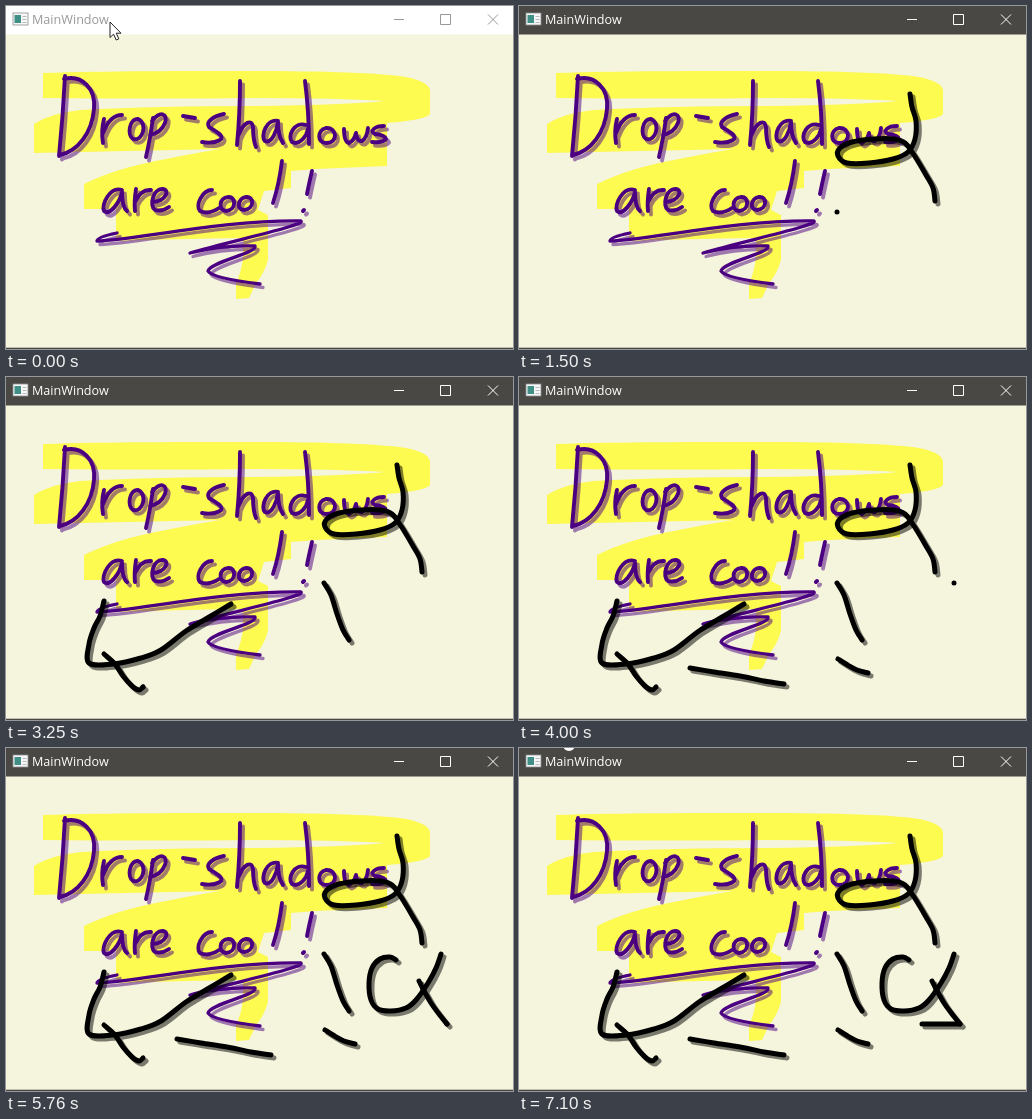
Write an HTML page that moves like this. It is 507 by 343 pixels and loops after 7.26 s.

```html
<!DOCTYPE html>
<html lang="en">
<head>
<meta charset="utf-8">
<title>MainWindow</title>
<style>
  html, body { margin: 0; width: 100%; height: 100%; overflow: hidden; background: #f5f4dc; }
  svg { display: block; width: 507px; height: 343px; }
  text { font: 12.6px "Open Sans", "Noto Sans", sans-serif; }
  .ink { fill: none; stroke-linecap: round; stroke-linejoin: round; }
</style>
</head>
<body>
<svg viewBox="0 0 507 343">
  <rect width="507" height="343" fill="#f5f4dc"/>

  <!-- highlighter -->
  <g fill="#fdfa50">
    <path d="M37 67 C100 65 180 65 245 65 C320 65 375 67 400 71 Q424 76 424 85 V108
      Q420 114 381 117 V160 L310 163 L285 165 V182 L258 185 L252 204 L262 209 V254
      Q258 268 250 277 L243 292 L230 293 V277 Q236 265 237 250 L237 232 Q170 233 110 235
      V203 H78 V178 Q110 162 160 153 Q195 146 215 143 Q120 145 28 147 V118
      Q45 107 75 104 Q150 100 250 100 Q340 99 379 95 Q330 92 250 92 Q150 93 37 92 Z"/>
  </g>

  <!-- handwriting -->
  <use href="#note" transform="translate(3 3.5)" opacity=".5"/>
  <g id="note" class="ink" stroke="#4b0082" stroke-width="3.9">
    <path d="M59 70 Q57 110 53 150 M58 73 C76 68 90 83 88 103 C86 127 72 145 54 149"/>
    <path d="M98 113 Q95 125 97 137 M97 127 Q104 109 116 109"/>
    <path d="M132 113 C123 113 121 129 127 133 C137 136 142 117 132 113"/>
    <path d="M147 112 Q144 134 140 151 M146 115 C155 104 162 108 159 117 Q155 127 144 129"/>
    <path d="M177 110 L189 112"/>
    <path d="M218 108 C208 110 199 116 203 121 C211 126 219 130 214 134 Q207 138 196 136"/>
    <path d="M234 75 Q234 108 231 139 M232 130 C238 115 246 113 247 121 Q247 134 250 141"/>
    <path d="M272 115 C261 112 254 130 259 135 C266 138 271 124 272 116 Q272 130 277 137"/>
    <path d="M300 119 C288 115 281 131 286 136 C294 140 301 129 302 123 M299 75 Q303 106 303 138"/>
    <path d="M320 122 C311 124 311 137 320 137 C333 137 331 121 320 122"/>
    <path d="M338 123 Q338 136 343 137 Q348 135 350 127 Q351 136 356 135 Q361 132 362 122"/>
    <path d="M378 120 C369 120 363 125 369 128 Q379 129 380 133 Q377 137 366 136"/>
    <path d="M116 184 C104 180 95 199 98 205 C104 210 114 196 116 186 Q116 201 121 205"/>
    <path d="M130 183 Q128 196 129 205 M129 196 Q135 183 145 184"/>
    <path d="M147 196 C160 195 164 184 157 183 C147 182 143 200 149 204 Q156 206 163 201"/>
    <path d="M206 184 C196 184 189 200 194 205 Q203 209 213 202"/>
    <path d="M222 191 C213 192 212 204 220 205 C231 204 230 190 222 191"/>
    <path d="M240 191 C232 192 230 204 238 204 C249 203 248 190 240 191"/>
    <path d="M276 155 Q273 179 267 197"/>
    <path d="M306 165 Q303 178 301 188 M297 205 L298 204"/>
    <path stroke-width="3.3" d="M111 227 Q91 231 91 235 C130 234 215 214 295 215
      C300 219 225 235 184 247 Q215 239 249 240 C252 247 204 256 202 265 Q206 272 254 278"/>
  </g>

  <g id="shade" class="ink" stroke="#000" stroke-width="5" opacity=".5" transform="translate(3 3)"></g>
  <g id="lines" class="ink" stroke="#000" stroke-width="5"></g>
  <circle id="dot" r="2.5"/>

  <!-- window frame -->
  <rect id="bar" width="507" height="28.5"/>
  <rect x="7" y="7" width="15" height="12" fill="#f7f7f7" stroke="#8a8d90" stroke-width=".8"/>
  <rect x="8.5" y="9" width="6.5" height="8" fill="#3f8f86"/>
  <path d="M16.5 10.5h4m-4 3h4m-4 3h4" stroke="#b5babd"/>
  <text id="label" x="26" y="18">MainWindow</text>
  <path id="buttons" fill="none" d="M388 13.5h10 M434.5 8.5h10v10h-10z M482 8.5l10 10m0-10l-10 10"/>
  <rect y="341.7" width="507" height="1.3" fill="#4a4844"/>
  <path id="arrow" d="M0 0V15.5L3.6 12.2L6.2 18L8.8 16.9L6.3 11.2H11Z" fill="#fff" stroke="#222" stroke-width="1"/>
  <circle id="tip" cx="50" cy="-3" r="6" fill="#fff"/>
</svg>
<script>
const LOOP = 7260, STEP = 83.45;
const $ = id => document.getElementById(id);

// Smooth curve through a few points.
function curve(text) {
  const p = text.split(' ').map(s => s.split(',').map(Number));
  let d = 'M' + p[0];
  for (let i = 0; i < p.length - 1; i++) {
    const a = p[i - 1] || p[i], b = p[i], c = p[i + 1], e = p[i + 2] || c;
    const h1 = b.map((v, k) => v + (c[k] - a[k]) / 6);
    const h2 = c.map((v, k) => v - (e[k] - b[k]) / 6);
    d += `C${h1} ${h2} ${c}`;
  }
  return d;
}

function addPath(parent, d) {
  const el = document.createElementNS('http://www.w3.org/2000/svg', 'path');
  el.setAttribute('d', d);
  $(parent).append(el);
  return el;
}

// Pen strokes: start, end, points.
const strokes = [
  [780, 1330, '391,88 393,101 397,115 396,133 389,146 374,153 350,157 328,157 319,150 321,142 333,136 355,133 375,133 386,137 395,149 407,169 414,182 416,195'],
  [1570, 1820, '318,206 325,218 331,237 337,253 343,263'],
  [1950, 2550, '225,227 205,239 180,254 155,273 135,281 107,287 83,286 83,267 88,251 94,239 98,224'],
  [2880, 3210, '98,277 109,287 117,299 126,309 133,313 137,310'],
  [3330, 3580, '171,291 195,295 221,299 245,304 265,307'],
  [3650, 3835, '319,282 327,287 338,293 349,296'],
  [4070, 4920, '435,206 430,220 422,235 410,252 400,260 385,263 372,261 365,252 363,235 366,220 374,211 384,209 390,212'],
  [5085, 5165, '413,233 417,241'],
  [5280, 5505, '417,241 425,255 433,266 441,276'],
  [5830, 6180, '441,276 403,276']
].map(([start, end, points]) => {
  const d = curve(points), line = addPath('lines', d), size = line.getTotalLength();
  return { start, end, size, line, shade: addPath('shade', d),
    at: f => { const q = line.getPointAtLength(f * size); return [q.x, q.y]; } };
});

const clamp = v => Math.max(0, Math.min(1, v));
const mix = (a, b, k) => a.map((v, i) => v + (b[i] - v) * k);

function penAt(t) {
  if (t < 80) return [104, 16];
  if (t < 320) return mix([104, 16], [135, 27], (t - 80) / 240);
  if (t < 650) return null;
  const next = strokes.findIndex(s => t < s.end);
  if (next < 0) {
    const end = strokes[strokes.length - 1];
    if (t < 6460) return mix(end.at(1), [378, 200], clamp((t - end.end) / 280));
    return t < 7090 ? mix([378, 200], [49, -17], (t - 6460) / 640) : null;
  }
  const s = strokes[next];
  if (t >= s.start) return s.at((t - s.start) / (s.end - s.start));
  if (!next) return mix([350, 70], s.at(0), (t - 650) / (s.start - 650));
  const last = strokes[next - 1], a = last.at(1), b = s.at(0);
  if (Math.hypot(b[0] - a[0], b[1] - a[1]) < 40) return a;
  return mix(a, b, clamp(1.5 * (t - last.end) / (s.start - last.end)));
}

function place(el, p) {
  el.style.display = p ? '' : 'none';
  if (p) el.setAttribute('transform', `translate(${p})`);
}

function draw(time) {
  const t = Math.floor((time % LOOP + 5) / STEP) * STEP;
  const active = t > 80;
  $('bar').setAttribute('fill', active ? '#4a4844' : '#fff');
  $('label').setAttribute('fill', active ? '#fff' : '#999');
  $('buttons').setAttribute('stroke', active ? '#fff' : '#999');

  for (const s of strokes) {
    const f = clamp((t - s.start) / (s.end - s.start));
    for (const el of [s.line, s.shade]) {
      el.style.display = t < s.start ? 'none' : '';
      el.setAttribute('stroke-dasharray', f < 1 ? `${f * s.size} ${s.size + 9}` : 'none');
    }
  }

  const pen = penAt(t), above = pen && pen[1] < 28;
  place($('arrow'), above ? pen : null);
  place($('dot'), above ? null : pen);
  $('tip').style.display = t > 7090 ? '' : 'none';
}

const begin = performance.now();
function tick() {
  draw(performance.now() - begin);
  requestAnimationFrame(tick);
}
tick();
</script>
</body>
</html>
```
